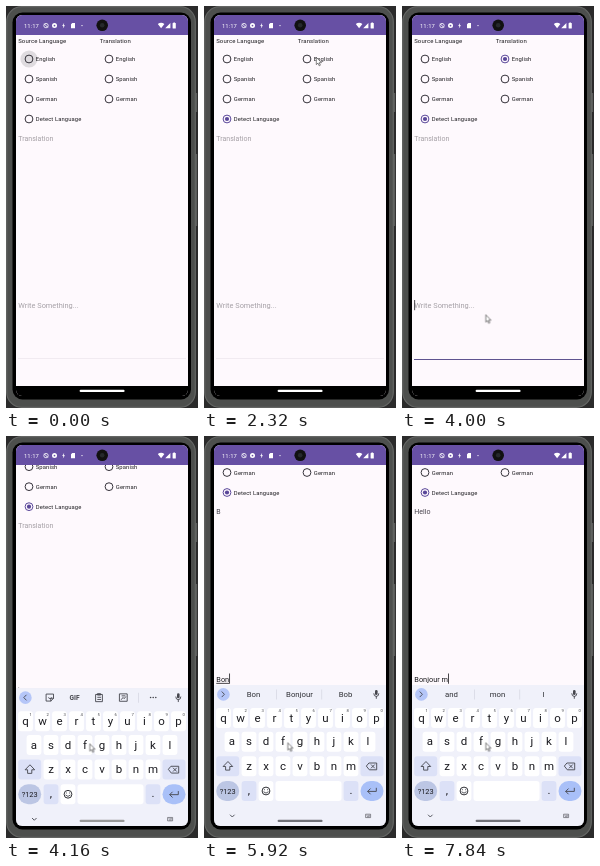
An HTML page that plays this animation: 192x402 px, repeating every 8000 ms.

```html
<!DOCTYPE html>
<html lang="en">
<head>
<meta charset="utf-8">
<title>Translator demo</title>
<style>
html, body { margin: 0; width: 100%; height: 100%; overflow: hidden; background: #2b2b2b; }
svg { display: block; width: 192px; height: 402px; font-family: Roboto, sans-serif; }
text { white-space: pre; }
.mid { text-anchor: middle; }
.line { fill: none; stroke: #45464d; stroke-width: .9; stroke-linecap: round; stroke-linejoin: round; }
.small { font-size: 5.85px; letter-spacing: .018em; fill: #1c1b1f; }
.head { font-size: 6px; letter-spacing: .018em; fill: #1c1b1f; }
.out { font-size: 7.05px; fill: #49454f; }
.field { font-size: 7.4px; fill: #1c1b1f; }
.hint { fill: #a5a0a6; }
.key { font-size: 11.5px; fill: #1b1b20; }
.sup { font-size: 4.2px; fill: #45464d; }
.word { font-size: 7.8px; fill: #303136; }

/* One percent of the loop is 80 ms. */
.page, .keyboard, .cursor, .pill, .ripple { animation: 8s linear infinite; }
.page { animation-name: page; }
.keyboard { animation-name: keyboard; }
.cursor { animation-name: cursor; }
.pill { animation-name: pill; }
.ripple { transform-box: fill-box; transform-origin: center; fill: #1c1b1f; opacity: 0; }
.r1 { animation-name: fade; }
.r2 { animation-name: press1; }
.r3 { animation-name: press2; }
@keyframes page {
  0%, 51% { transform: none; animation-timing-function: ease-out; }
  52.8%, 100% { transform: translateY(-56.5px); }
}
@keyframes keyboard {
  0%, 50.6% { transform: translateY(142px); animation-timing-function: ease-out; }
  52.2%, 100% { transform: none; }
}
@keyframes cursor {
  0%, 13.99% { transform: translate(46px, 115px); opacity: 0; }
  14%, 19% { transform: translate(46px, 115px); opacity: 1; animation-timing-function: ease-in-out; }
  27% { transform: translate(111px, 51px); }
  29%, 44% { transform: translate(112px, 51px); animation-timing-function: ease-in-out; }
  49%, 51% { transform: translate(83.5px, 308.5px); }
  53%, 100% { transform: translate(83.5px, 306.5px); opacity: 1; }
}
@keyframes pill {
  0%, 51% { fill: #fff; }
  52% { fill: #999; }
  59%, 100% { fill: #707178; }
}
@keyframes fade {
  0% { opacity: .13; }
  5%, 100% { opacity: 0; }
}
@keyframes press1 {
  0%, 16.9% { opacity: 0; transform: scale(.4); }
  17% { opacity: .13; transform: scale(.6); }
  19% { opacity: .13; transform: none; }
  23%, 100% { opacity: 0; transform: none; }
}
@keyframes press2 {
  0%, 41.9% { opacity: 0; transform: scale(.4); }
  42% { opacity: .13; transform: scale(.6); }
  44% { opacity: .13; transform: none; }
  48%, 100% { opacity: 0; transform: none; }
}
</style>
</head>
<body>
<svg id="stage" viewBox="0 0 192 402"></svg>
<script>
const rules = new Map();
const pen = document.createElement('canvas').getContext('2d');
pen.font = '74px Roboto, sans-serif';
const fieldWidth = s => pen.measureText(s).width / 10;

const text = (x, y, s, cls, extra = '') => `<text x="${x}" y="${y}" class="${cls}" ${extra}>${s}</text>`;
const rect = (x, y, w, h, fill, r = 0, extra = '') =>
  `<rect x="${x}" y="${y}" width="${w}" height="${h}" rx="${r}" fill="${fill}" ${extra}/>`;
const circle = (x, y, r, fill, extra = '') => `<circle cx="${x}" cy="${y}" r="${r}" fill="${fill}" ${extra}/>`;
const line = (d, extra = '') => `<path class="line" d="${d}" ${extra}/>`;

// Shows markup only between two points of the loop, in percent.
function during(from, to, markup) {
  const name = `w${from}_${to}`;
  rules.set(name, `@keyframes ${name} { 0% { visibility: hidden } ${from}% { visibility: visible }` +
    (to < 100 ? ` ${to}%, 100% { visibility: hidden }` : ' 100% { visibility: visible }') + ' }');
  return `<g style="animation: ${name} 8s step-end infinite">${markup}</g>`;
}

function radio(x, y, label, pickedAt) {
  const ring = color => circle(x, y, 3.9, 'none', `stroke="${color}" stroke-width="1"`);
  const plain = ring('#35323a');
  const mark = pickedAt
    ? during(0, pickedAt, plain) + during(pickedAt, 100, ring('#5a4799') + circle(x, y, 2.1, '#5a4799'))
    : plain;
  return mark + text(x + 6.8, y + 2.1, label, 'small');
}

function phone() {
  return rect(0, 0, 192, 402, '#2b2b2b') +
    rect(189, 87, 2.2, 19, '#5a5c5a') + rect(189, 148, 2.2, 72, '#5a5c5a') +
    rect(.7, .7, 188.6, 400.6, '#4d4f4d', 15, 'stroke="#646664" stroke-width="1.2"') +
    rect(6.5, 6.5, 178.5, 387, '#000', 10);
}

function statusBar() {
  const white = 'style="stroke:#fff"';
  return rect(10, 9, 172, 20, '#6750a4') +
    text(17.9, 21.8, '11:17', 'small', 'style="fill:#fff"') +
    circle(40, 19.6, 2.2, 'none', 'stroke="#fff" stroke-width=".8"') + line('M38.5 18.1l3 3', white) +
    circle(48.5, 19.6, 2.5, '#fff') + circle(48.5, 19.6, .9, '#6750a4') +
    '<path d="M58.2 16.8l-2 3.2h1.2l-.6 2.6l2.2-3.3h-1.3z" fill="#fff"/>' +
    '<path d="M65 18.2l1.3-1.3h2.7v5.4h-4z" fill="#fff"/>' + circle(76, 19.6, .7, '#fff') +
    '<path d="M151.8 17.9q3.3-2.5 6.6 0l-3.3 4.4zM159.2 22.3h5.2v-5.2z" fill="#fff"/>' +
    rect(166.6, 17.1, 3.2, 5.3, '#fff', .5) + rect(167.4, 16.5, 1.6, 1, '#fff') +
    circle(96.2, 19.3, 5.8, '#111') + circle(96.2, 19.3, 2.3, '#26292c');
}

// Text field contents: start, end, text, spans of underline as [from, to, colour].
function fieldText() {
  const dark = '#1c1b1f', red = '#d8343c';
  const states = [
    [65, 67, 'B', [['', 'B', dark]]],
    [67, 69, 'Bo', [['', 'B', dark]]],
    [69, 72, 'Bo', [['', 'Bo', dark]]],
    [72, 76, 'Bon', [['', 'Bon', dark]]],
    [76, 80, 'Bonj', [['', 'Bonj', dark]]],
    [80, 83, 'Bonjou', [['', 'Bonjou', dark]]],
    [83, 86, 'Bonjout', [['', 'Bonjout', dark]]],
    [86, 88, 'Bonjout m', [['', 'Bonjout', red], ['Bonjout ', 'Bonjout m', dark]]],
    [88, 89, 'Bonjout', [['', 'Bonjout', red]]],
    [89, 91, 'Bonjou', [['', 'Bonjou', dark]]],
    [91, 94, 'Bonjour', [['', 'Bonjour', dark]]],
    [94, 98, 'Bonjour ', []],
    [98, 100, 'Bonjour m', []],
  ];
  const caret = s => rect(12.3 + fieldWidth(s), 294, .8, 10.2, '#1c1b1f');
  return during(0, 65, text(12.3, 302.2, 'Write Something...', 'field hint')) +
    during(49, 55, caret('')) + during(62, 65, caret('')) +
    states.map(([from, to, s, marks]) => during(from, to,
      text(12.3, 302.2, s, 'field') + caret(s) +
      marks.map(([a, b, color]) =>
        rect(12.3 + fieldWidth(a), 303.4, fieldWidth(b) - fieldWidth(a), .8, color)).join(''))).join('');
}

function page() {
  const output = [
    [67, 76, 'B'], [76, 83, 'Bon'], [83, 86, 'Bonjou'],
    [86, 91, 'Bonjout m'], [91, 97, 'Bonjou'], [97, 100, 'Hello'],
  ];
  return '<g class="page">' +
    text(12.2, 36.8, 'Source Language', 'head') + text(93.8, 36.8, 'Translation', 'head') +
    circle(23, 53, 8.6, '', 'class="ripple r1"') +
    circle(23, 113, 8.6, '', 'class="ripple r2"') +
    circle(103, 53, 8.6, '', 'class="ripple r3"') +
    ['English', 'Spanish', 'German'].map((name, i) =>
      radio(23, 53 + 20 * i, name) + radio(103, 53 + 20 * i, name, i ? 0 : 42)).join('') +
    radio(23, 113, 'Detect Language', 17) +
    during(0, 67, text(12.3, 134.6, 'Translation', 'out hint')) +
    output.map(([from, to, s]) => during(from, to, text(12.3, 134.6, s, 'out'))).join('') +
    fieldText() +
    during(0, 49, rect(12, 352, 168, 1, '#f1ebf1')) +
    during(49, 100, rect(12, 353, 168, 1, '#5f5490')) + '</g>';
}

function toolbar() {
  return line('M20.2 255.8l-2.4 2.5l2.4 2.5') +
    line('M40.5 254.8h7v4.3l-2.7 2.7h-4.3zM42.5 258.6q1.5 2 3 0M47.4 259h-2.6v2.7') +
    text(68.5, 260.8, 'GIF', 'mid', 'font-size="6.6" font-weight="700" fill="#45464d"') +
    line('M90 255.2h6.4v7.2h-6.4zM91.8 254.4h2.8v1.4h-2.8zM91.7 258h3M91.7 260.2h3') +
    line('M113.8 254.6h7.4v7.4h-7.4zM115.4 260.2l1.6-2l1.2 1.2l1.4-1.8M116 256.6h3') +
    rect(132, 253.5, .6, 10, '#cfd1dc') +
    [144.6, 147.2, 149.8].map(x => circle(x, 258.3, .8, '#45464d')).join('');
}

function suggestions(words) {
  return line('M18 255.8l2.4 2.5l-2.4 2.5') +
    words.map((s, i) => text(49.5 + 46 * i, 261, s, 'word mid')).join('') +
    rect(72, 253.5, .6, 10, '#cfd1dc') + rect(117.5, 253.5, .6, 10, '#cfd1dc');
}

function keyboard() {
  const light = '#dce1f7', rows = [282, 305.8, 330.3, 355];
  const plate = (x, row, w, fill, r = 3) => rect(x - w / 2, rows[row] - 10, w, 20, fill, r);
  const letters = (s, x0, row) => [...s].map((c, i) => {
    const x = x0 + 17 * i;
    return plate(x, row, 14.8, '#fff') + text(x, rows[row] + 3.6, c, 'key mid') +
      (row ? '' : text(x + 5.2, 276.4, (i + 1) % 10, 'sup mid'));
  }).join('');
  const strips = [
    [70, 74, ['Bo', 'Boo', 'Bob']],
    [74, 76, ['Bon', 'Bonjour', 'Bob']],
    [76, 83, ['Bonj', 'Bonjour', 'Bon']],
    [83, 86, ['Bonjout', 'Bonjour', 'Bonjou']],
    [88, 91, ['Bonjou', 'Bonjour', 'Bonjout']],
    [91, 97, ['Bonjour', 'Bonjours', 'Bon']],
    [97, 100, ['and', 'mon', 'I']],
  ];
  return '<g class="keyboard">' + rect(10, 249, 172, 141, '#f0f1fa') +
    circle(19.4, 258.4, 6.3, '#b5c6f8') +
    during(0, 70, toolbar()) + during(86, 88, toolbar()) +
    strips.map(([from, to, words]) => during(from, to, suggestions(words))).join('') +
    rect(171, 254, 2.6, 5, '#45464d', 1.3) + line('M169.8 257.7q0 2.7 2.5 2.7t2.5-2.7M172.3 260.4v2') +
    letters('qwertyuiop', 19.5, 0) + letters('asdfghjkl', 28, 1) + letters('zxcvbnm', 45, 2) +
    plate(23.7, 2, 23, light) + line('M23.7 325.8l-4.6 4.7h2.5v3.6h4.2v-3.6h2.5z') +
    plate(168, 2, 23, light) + line('M165.3 327h7.4v6.8h-7.4l-2.7-3.4zM167.3 328.8l3.2 3.2M170.5 328.8l-3.2 3.2') +
    plate(23.7, 3, 23, '#bcc6e4', 10) + text(23.7, 357.7, '?123', 'mid', 'font-size="7.4" fill="#1b1b20"') +
    plate(45, 3, 14.8, light) + text(45, 358, ',', 'key mid') +
    plate(62, 3, 14.8, '#fff') + circle(62, 355, 3.9, 'none', 'stroke="#303136"') +
    line('M59.8 356q2.2 2.6 4.4 0M60.5 353.7v.1M63.5 353.7v.1') +
    plate(104.5, 3, 66, '#fff') +
    plate(147, 3, 14.8, light) + text(147, 358, '.', 'key mid') +
    plate(168, 3, 23, '#a9c0f8', 10) + line('M172.3 352.2v3.2h-8.4M166.3 352.8l-2.6 2.6l2.6 2.6') +
    line('M26.3 379l2 2l2-2') +
    line('M162 378.2h4.6v3.4h-4.6zM163 379.4h.1M164.3 379.4h.1M165.6 379.4h.1M163.3 380.7h2', 'style="stroke-width:.6"') +
    '</g>';
}

const stage = document.getElementById('stage');
stage.innerHTML = '<clipPath id="screen"><rect x="10" y="9" width="172" height="381" rx="6"/></clipPath>' +
  phone() + '<g clip-path="url(#screen)">' + rect(10, 9, 172, 381, '#fef9fd') + page() +
  rect(10, 380, 172, 10, '#000') + keyboard() +
  rect(73.6, 383.8, 45, 2.2, '#fff', 1.1, 'class="pill"') + statusBar() + '</g>' +
  '<path class="cursor" d="M.3.3v7.3l1.7-1.5l1.2 2.7l1.2-.6l-1.2-2.5h2.3z" fill="#fff" stroke="#333" stroke-width=".6"/>';

const style = document.createElement('style');
style.textContent = [...rules.values()].join('\n');
document.head.append(style);
</script>
</body>
</html>
```
